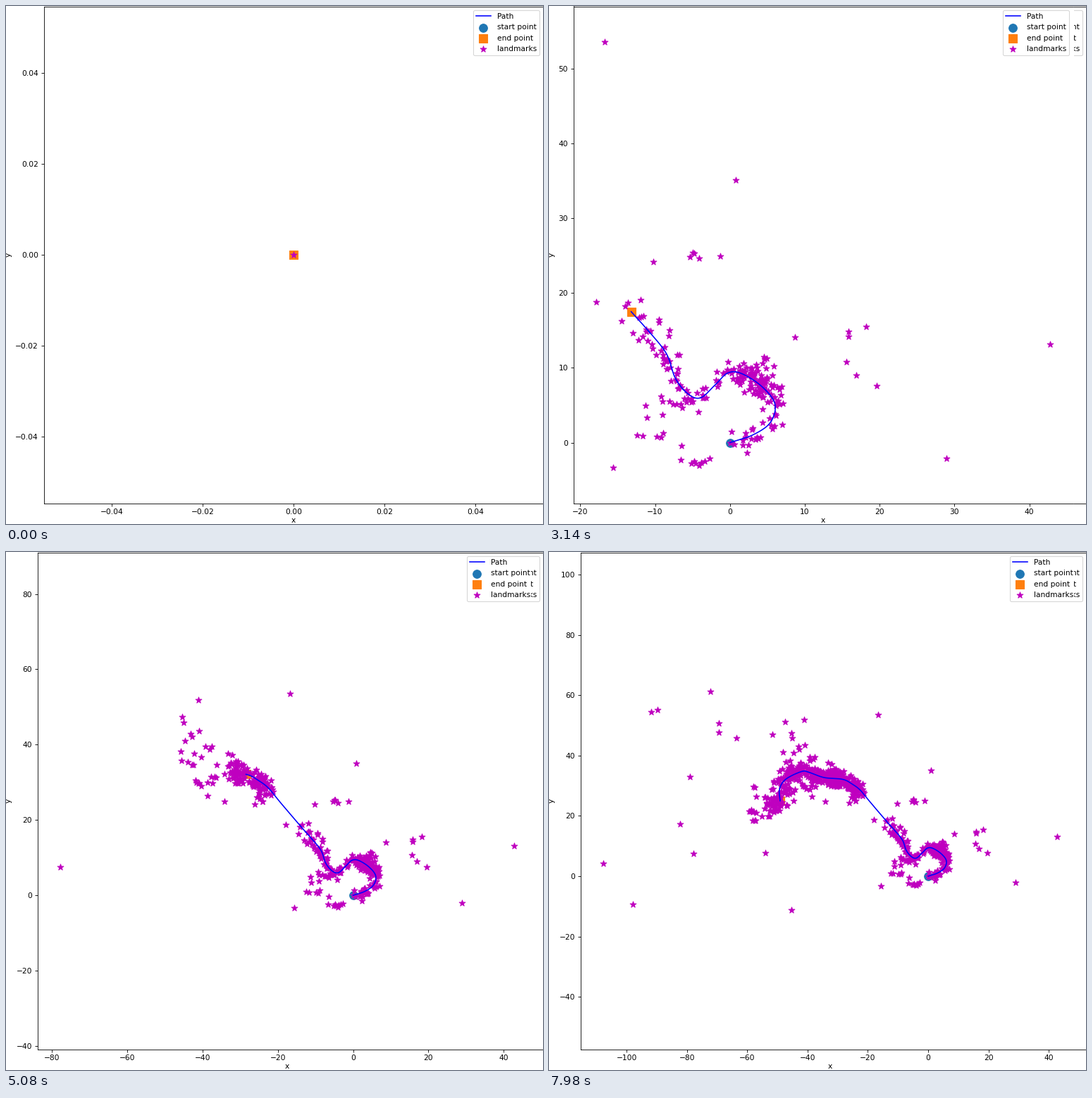
A matplotlib script that plays this animation: 762x735 px, repeating every 8000 ms.

```python
import numpy as np
import matplotlib.pyplot as plt
from matplotlib.animation import FuncAnimation
from matplotlib.transforms import Bbox, IdentityTransform

W, H, DPI = 762, 735, 76.8
LOOP, STEP = 8000, 40
BOTTOM, AX_W, AX_H = 29.5, 709, 705
SEAM = 745            # right of this column the first legend stays on screen
SUBDIV = 12

# Legs of the route: the time each one ends and its key points
legs = [
    (240, [(0, 0)]),
    (1940, [(3.1, 1.05), (5.4, 2.7), (6, 5.2), (4.2, 7.55), (1.5, 9.25), (-.3, 9.3),
            (-1.9, 7.8)]),
    (3140, [(-3.9, 6), (-5.6, 6.5), (-7.3, 8.6), (-8.5, 11.9), (-11, 15.05),
            (-13.2, 17.5)]),
    (3760, [(-19.1, 24.4)]),
    (5080, [(-22.4, 28.4), (-25, 30.4), (-28.3, 32.1)]),
    (6760, [(-34.5, 32.7), (-39.4, 34.4)]),
    (7980, [(-42, 34.7), (-47.3, 32.1), (-49.3, 28.8), (-49.1, 25)]),
]


def smooth(points):
    """Catmull-Rom curve through the points."""
    p = np.array(points, float)
    p = np.vstack([2 * p[0] - p[1], p, 2 * p[-1] - p[-2]])
    u = np.linspace(0, 1, SUBDIV, endpoint=False)[:, None]
    parts = [b + u * (c - a) / 2 + u**2 * (a - 2.5 * b + 2 * c - d / 2)
             + u**3 * (1.5 * (b - c) + (d - a) / 2)
             for a, b, c, d in zip(p, p[1:], p[2:], p[3:])]
    return np.vstack(parts + [p[-2:-1]])


route = smooth([p for _, leg in legs for p in leg])
length = np.r_[0, np.cumsum(np.hypot(*np.diff(route, axis=0).T))]
leg_times = [t for t, _ in legs]
leg_ends = length[(np.cumsum([len(leg) for _, leg in legs]) - 1) * SUBDIV]


def position(t):
    s = np.interp(t, leg_times, leg_ends)
    return np.stack([np.interp(s, length, route[:, k]) for k in (0, 1)], axis=-1)


def travelled(t):
    s = np.interp(t, leg_times, leg_ends)
    return np.vstack([route[length < s], position(t)])


rng = np.random.default_rng(11)
seen_at, landmarks = [np.zeros(1)], [np.zeros((1, 2))]


def observe(t0, t1, count, spread, centre=None):
    """Landmarks found one by one, around a centre or else along the route."""
    t = np.linspace(t0, t1, count)
    noise = np.clip(rng.normal(size=(count, 2)), -1.9, 1.9)
    seen_at.append(t)
    landmarks.append((position(t) if centre is None else centre) + noise * spread)


# Around the first loop
observe(260, 950, 24, (1, 1))
observe(850, 1050, 6, (3, 3), (14, 13))
observe(1050, 1650, 75, (1, .8))
observe(1100, 1650, 32, (1.4, 1.3), (3.5, 9))
observe(1500, 1700, 6, (4, .9), (-6, 24.8))
observe(1650, 2000, 10, (.6, .4))
observe(1600, 1930, 18, (2, 1.6), (-7.5, 5.2))
observe(1650, 1930, 8, (1.1, .25), (-4.5, -2.6))
observe(1700, 1930, 6, (1.8, .8), (-9, .5))
# Climbing north-west
observe(2100, 2750, 28, (.9, .9))
observe(2700, 3130, 22, (1.3, 1.2))
observe(3350, 3750, 14, (1.8, 2), (-25.4, 28))
# Dense bend and ridge
observe(4250, 5060, 55, (1, 1.4))
observe(4100, 5060, 45, (1.2, 1.5), (-31, 32.7))
observe(4000, 5060, 24, (4, 4), (-38, 32))
observe(4400, 5060, 10, (3.4, 4), (-43.5, 42))
observe(5100, 6740, 105, (1.2, 1.3))
observe(5200, 6700, 26, (2.8, 5.2), (-44.5, 34))
observe(5700, 6300, 5, (8, 2), (-60, 48))
# Final turn south
observe(6800, 7750, 70, (1.9, 1.6))
observe(7150, 7970, 50, (2, 2.4), (-50.5, 24.4))
observe(7200, 7950, 12, (1.2, 4), (-57, 22))

# Lone far landmarks that set the extent of the view: time, x, y
lone = np.array([
    (500, 28.9, -2.1), (780, 19.6, 7.6), (860, 42.8, 13.1), (1300, .8, 35.1),
    (1800, -15.6, -3.3), (2900, -16.7, 53.5), (3080, -17.9, 18.8), (3700, -28.9, 31),
    (4600, -41.1, 51.8), (4700, -77.8, 7.5), (5400, -58.1, 18.4), (5500, -107.8, 4.3),
    (5700, -78.9, 33), (6300, -98, -9.3), (6500, -91.8, 54.5), (6900, -89.8, 55.1),
    (7000, -72.2, 61.3), (7100, -82.2, 17.2), (7300, -45.4, -11.3), (7400, -54.1, 7.8),
])
seen_at = np.concatenate(seen_at + [lone[:, 0]])
landmarks = np.vstack(landmarks + [lone[:, 1:]])


def place(axes, left):
    axes.set_position([left / W, BOTTOM / H, AX_W / W, AX_H / H])


def clip(x0, x1, *artists):
    for artist in artists:
        for part in artist.findobj():
            part.set_clip_box(Bbox([[x0, 0], [x1, H]]))
            part.set_clip_on(True)


def label_width(text):
    return sum({"\u2212": 10, ".": 3}.get(c, 6) for c in text)


plt.rcParams["font.family"] = "DejaVu Sans"
fig = plt.figure(figsize=(W / DPI, H / DPI), dpi=DPI, facecolor="white")
ax = fig.add_axes([0, 0, 1, 1])
path, = ax.plot([0], [0], "b", label="Path")
ax.scatter([0], [0], s=120, color="C0", label="start point")
end = ax.scatter([0], [0], s=120, marker="s", color="C1", label="end point")
stars = ax.scatter([0], [0], s=72, marker="*", color="m", label="landmarks")
ax.set_xlabel("x")
ax.set_ylabel("y")
ax.yaxis.set_label_coords(8.5, BOTTOM + AX_H / 2, IdentityTransform())
ax.spines["right"].set_visible(False)
legend = ax.legend(loc="upper right")
clip(0, SEAM, legend, ax.spines["top"], ax.spines["bottom"])

stale = fig.add_axes([0, 0, 1, 1])
place(stale, 53.5)
stale.patch.set_visible(False)
stale.set(xticks=[], yticks=[])
for side in ("left", "right"):
    stale.spines[side].set_visible(False)
stale_legend = stale.legend(*ax.get_legend_handles_labels(), loc="upper right")
clip(SEAM, W, stale_legend, stale.spines["top"], stale.spines["bottom"])


def update(i):
    t = i * STEP + STEP / 2
    trail = travelled(t)
    marks = landmarks[seen_at <= t]
    path.set_data(*trail.T)
    end.set_offsets(trail[-1:])
    stars.set_offsets(marks)

    # Equal scales, five percent margin, centred on the data
    data = np.vstack([trail, marks])
    low, high = data.min(0), data.max(0)
    dx, dy = high - low
    unit = 1.1 * (max(dx / AX_W, dy / AX_H) or .1 / AX_W)
    (cx, cy), rx, ry = (low + high) / 2, unit * AX_W / 2, unit * AX_H / 2
    ax.set(xlim=(cx - rx, cx + rx), ylim=(cy - ry, cy + ry))

    # The widest y label pushes the axes to the right
    ticks = [v for v in ax.yaxis.get_majorticklocs() if abs(v - cy) <= ry]
    labels = ax.yaxis.get_major_formatter().format_ticks(ticks)
    left = 22.5 + max(map(label_width, labels))
    place(ax, left)
    ax.xaxis.set_label_coords(left + AX_W / 2, 10, IdentityTransform())
    return path, end, stars


anim = FuncAnimation(fig, update, frames=LOOP // STEP, interval=STEP,
                     repeat=True, repeat_delay=0, blit=False)
plt.show()
```
